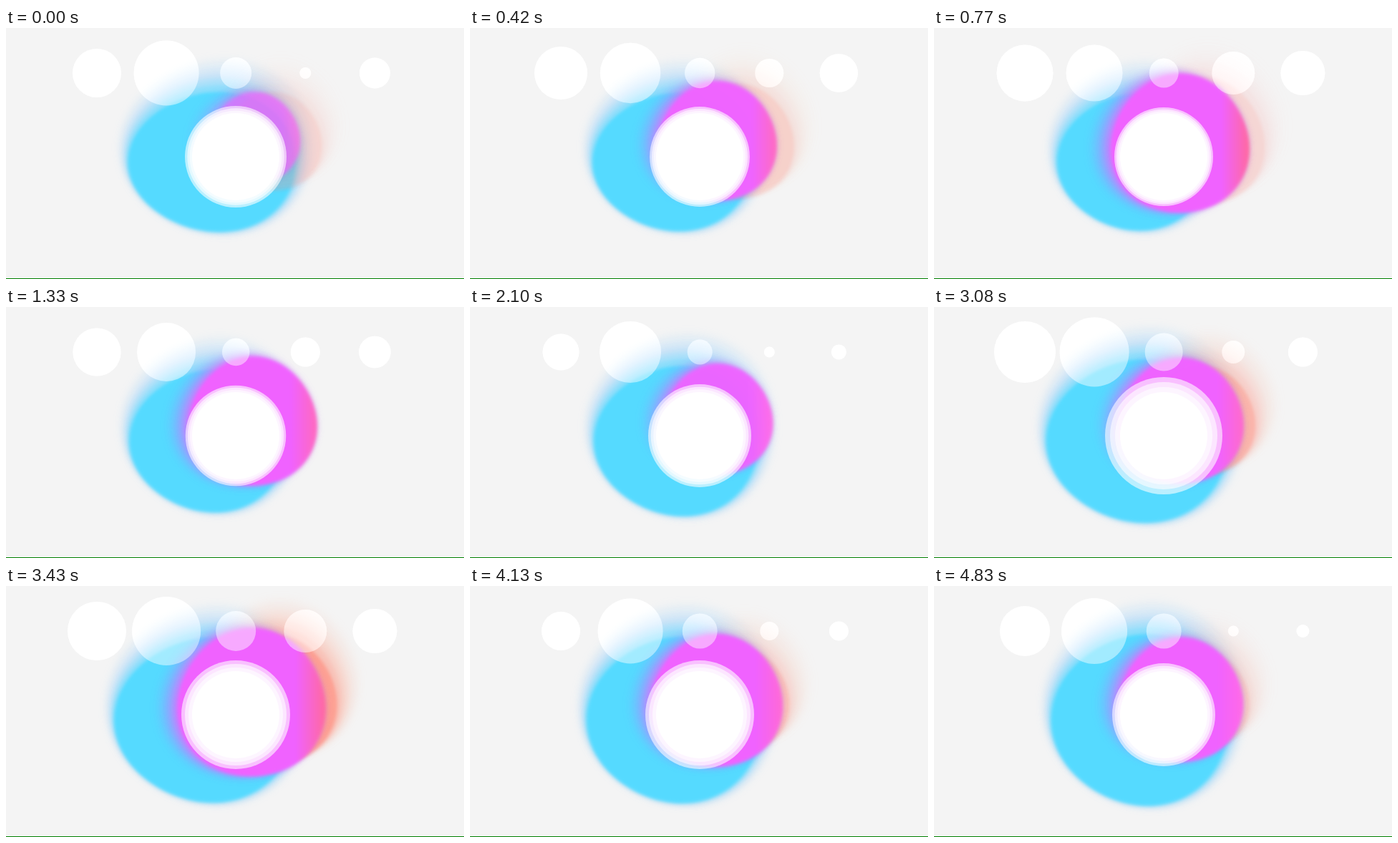
These frames come from a looping animation (640x351 px, 4900 ms). An HTML page with a canvas:

```html
<!DOCTYPE html>
<html lang="en">
<head>
<meta charset="utf-8">
<title>Pulsing blobs</title>
<style>
  html, body { margin: 0; height: 100%; overflow: hidden; background: #f4f4f4; }
  canvas { display: block; width: 640px; height: 351px; }
</style>
</head>
<body>
<canvas id="stage" width="640" height="351"></canvas>
<script>
const ctx = document.getElementById('stage').getContext('2d');
const LOOP = 4900, STEP = 70, LAYERS = 6, CORE = 61;

// Key levels: time, five disc radii from bass to treble, ring radius.
// The blobs follow these levels.
const keys = [
  [0, 34, 45.5, 22, 8, 21.5, 71],
  [770, 39.5, 39.5, 20.5, 30, 31, 69],
  [2100, 25.5, 43, 17.5, 7.5, 10.5, 72],
  [2730, 45, 49, 25, 2, 10, 88],
  [3430, 41, 48, 28, 30, 31, 76],
  [4130, 27, 45.5, 24.5, 13, 13.5, 76],
  [4830, 35, 46, 24.5, 7.5, 9, 72]
];

const mix = (a, b, k) => a + (b - a) * k;

function levelsAt(time) {
  const i = Math.max(1, keys.findIndex(key => key[0] >= time));
  const from = keys[i - 1], to = keys[i];
  const k = (time - from[0]) / (to[0] - from[0]);
  return from.map((v, n) => mix(v, to[n], k)).slice(1);
}

function disc(x, y, r, fill) {
  ctx.fillStyle = fill;
  ctx.beginPath();
  ctx.arc(x, y, r, 0, Math.PI * 2);
  ctx.fill();
}

// An ellipse with three soft corners, one of them towards `turn`
function blobPath(x, y, rx, ry, turn) {
  ctx.beginPath();
  for (let a = 0; a < Math.PI * 2; a += .05) {
    const k = 1 + .022 * Math.cos(3 * (a - turn));
    ctx.lineTo(x + rx * k * Math.cos(a), y + ry * k * Math.sin(a));
  }
  ctx.closePath();
}

// Layers run from the wide haze in to the crisp core
function blob({ x, y, rx, ry, turn, opacity = 1, haze, fill, hazeFill }) {
  const [dx, dy, gx, gy] = haze;
  for (let i = 0; i < LAYERS; i++) {
    const k = i / (LAYERS - 1), out = 1 - k;
    ctx.fillStyle = k < .5 ? hazeFill : fill;
    ctx.globalAlpha = opacity * (k === 1 ? 1 : .1 + .28 * k);
    ctx.filter = `blur(${mix(6, 2, k)}px)`;
    blobPath(x + dx * out, y + dy * out, rx + gx * out, ry + gy * out, turn);
    ctx.fill();
  }
  ctx.globalAlpha = 1;
  ctx.filter = 'none';
}

function drawBlobs(time, [, bass, mid, high, treble]) {
  const grow = time / LOOP, punch = bass - 45, ratio = high / treble;

  blob({
    x: 294 - .45 * high, y: 187, turn: Math.PI,
    rx: 116 + 6 * grow + 2 * punch, ry: 97 + 22 * grow + .9 * punch,
    haze: [6, -21, 18, 25], fill: '#55daff', hazeFill: '#8cccff'
  });

  const spread = 62 + .95 * high;
  blob({
    x: 372, y: 160, rx: spread, ry: spread, turn: -Math.PI / 2,
    opacity: .042 * Math.sqrt(Math.max(0, mid - 20) * high),
    haze: [12, -30, 20, 20], fill: '#ff8f80', hazeFill: '#ffab9c'
  });

  const size = 48 + 25 * ratio + .75 * high + 12 * grow;
  const x = 343 + .12 * (100 - size), warm = high / 30;
  const blush = ctx.createLinearGradient(x - size, 0, x + size, 0);
  blush.addColorStop(.8, '#f062ff');
  blush.addColorStop(1, `rgb(255, 105, ${255 - 95 * warm})`);
  blob({
    x, y: 164 - .25 * (100 - size), rx: size, ry: size, turn: -Math.PI / 2,
    opacity: Math.min(1, .2 + ratio),
    haze: [-14, -2, 14, 6], fill: blush, hazeFill: '#c07aff'
  });
}

function draw(time) {
  const levels = levelsAt(time), ring = levels.pop();
  const discs = fill => levels.forEach((r, i) => disc(127 + i * 97.1, 63, r, fill));

  ctx.fillStyle = '#f4f4f4';
  ctx.fillRect(0, 0, 640, 351);
  discs('#fff');
  drawBlobs(time, levels);
  discs('rgba(255, 255, 255, .45)');

  for (let i = 3; i > 0; i--) {
    disc(321, 180, mix(CORE, ring, i / 3), 'rgba(255, 255, 255, .6)');
  }
  disc(321, 180, CORE, '#fff');

  ctx.fillStyle = 'green';
  ctx.fillRect(0, 350, 640, 1);
}

let shown = -1;
function tick() {
  const time = Math.floor(performance.now() % LOOP / STEP) * STEP;
  if (time !== shown) draw(shown = time);
  requestAnimationFrame(tick);
}
tick();
</script>
</body>
</html>
```
